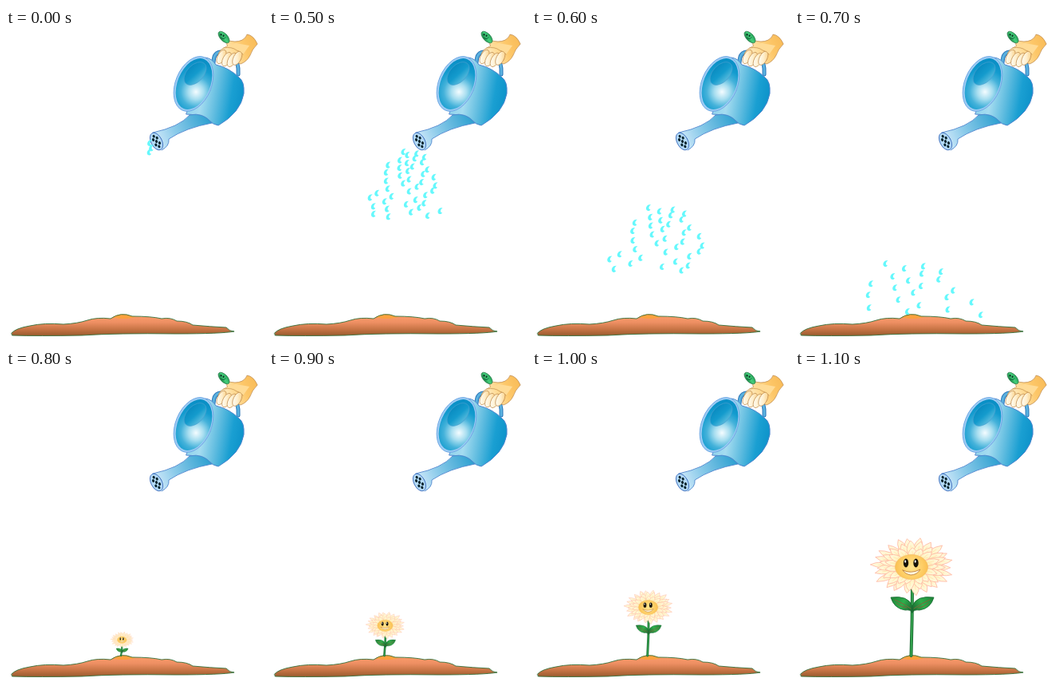
An HTML page with a canvas that plays this animation: 322x392 px, repeating every 3.1 s.

```html
<!DOCTYPE html>
<html lang="en">
<head>
<meta charset="utf-8">
<title>Watering</title>
<style>
html, body { margin: 0; width: 100%; height: 100%; overflow: hidden; background: #fff; }
canvas { display: block; width: 322px; height: 392px; }
</style>
</head>
<body>
<canvas id="stage" width="322" height="392"></canvas>
<script>
const g = document.getElementById('stage').getContext('2d');
const LOOP = 3100;
const TAU = Math.PI * 2;
g.lineJoin = g.lineCap = 'round';

function paint(path, fill, line, width = 1) {
  const p = typeof path === 'string' ? new Path2D(path) : path;
  if (fill) { g.fillStyle = fill; g.fill(p); }
  if (line) { g.strokeStyle = line; g.lineWidth = width; g.stroke(p); }
}

function oval(x, y, rx, ry, turn = 0) {
  const p = new Path2D();
  p.ellipse(x, y, rx, ry, turn, 0, TAU);
  return p;
}

function addStops(gradient, colors) {
  colors.forEach((c, i) => gradient.addColorStop(i / (colors.length - 1), c));
  return gradient;
}
const blend = (x0, y0, x1, y1, ...colors) => addStops(g.createLinearGradient(x0, y0, x1, y1), colors);
const glow = (x, y, r, ...colors) => addStops(g.createRadialGradient(x, y, 0, x, y, r), colors);

// run a drawing in moved, turned and scaled coordinates
function at(x, y, turn, sx, sy, body) {
  g.save();
  g.translate(x, y);
  g.rotate(turn);
  g.scale(sx, sy);
  body();
  g.restore();
}

function seeded(seed) {
  return () => {
    seed = (seed * 16807) % 2147483647;
    return seed / 2147483647;
  };
}

const soil = 'M7 382 Q12 376 30 373 Q48 369 72 371 Q90 370 102 366 T131 364 Q144 355 158 361' +
  ' Q182 361 195 364 Q206 362 214 367 Q227 367 234 372 Q256 374 276 375 Q280 380 286 380' +
  ' Q270 383 212 383 Q140 382 95 385 Q40 386 8 385 Z';

function drawSoil() {
  paint(soil, blend(0, 360, 0, 386, '#fb9c6a', '#ee8f63', '#c77445', '#95592c'));
  g.save();
  g.clip(new Path2D(soil));
  paint(oval(147, 360, 16, 4), 'rgba(255,164,45,.7)');
  g.restore();
  paint(soil, null, '#34713c', .9);
}

function drawCan() {
  const edge = '#4f86cf';
  const handle = 'M260 43 Q260 30 270 30 L284 34 Q292 42 291 58';
  paint(handle, null, '#2f78b8', 5);
  paint(handle, null, '#5ab2e0', 3);
  // body
  paint('M250 37 Q258 38 263 46 Q280 50 292 62 Q299 67 298 82 Q294 106 266 122' +
    ' Q259 121 254 115 Q240 108 226 108 Z',
    blend(228, 80, 300, 92, '#8fd2ec', '#a5dcf0', '#62bde0', '#1a9fd2', '#0a90c8'), edge);
  // spout
  paint('M230 109 Q217 124 184 131 L195 153 Q205 148 204 139 Q225 125 258 119 Q247 105 230 109 Z',
    blend(190, 140, 256, 112, '#c8e6f8', '#8ccbea', '#5ab4dc', '#2a9fd0'));
  paint('M258 119 Q247 105 230 109 Q217 124 184 131 M195 153 Q205 148 204 139 Q225 125 258 119',
    null, edge, .9);
  // rim and opening
  paint(oval(235, 70, 22.5, 36, .39), '#9ccbf4', '#6fa8e4');
  paint(oval(235.5, 70, 20.5, 33.5, .39),
    glow(238, 80, 38, '#f4fcff', '#a8def0', '#45b2da', '#149ccf', '#0a90c6'));
  paint(oval(237, 57, 10.5, 17, .75),
    blend(228, 48, 246, 68, '#0788be', '#149bcd', '#6fc6e2'), '#4aa0d0', .7);
  // rose with rows of holes
  paint(oval(188.5, 142, 6.8, 11.7, -.48), '#b4daf6', '#4272c0');
  at(188.5, 142, -.48, 1, 1, () => {
    for (let row = -2; row <= 2; row++) {
      for (const side of row % 2 ? [-2.6, 2.6] : [0]) paint(oval(side, row * 3.6, 1.5, 1.9), '#06232c');
    }
  });
}

function drawHand() {
  const edge = '#b98344';
  paint('M276 15 Q288 19 296 15 Q301 12 302 8 Q310 9 315 20 Q308 27 306 34' +
    ' Q302 42 294 45 L266 33 Q268 26 277 23 Z',
    blend(270, 34, 312, 16, '#fff0cd', '#ffdc98', '#fdc769', '#f9bd5a'), edge, .7);
  for (let i = 0; i < 4; i++) {
    const x = 270 + i * 6.6, y = 36 + 4 * Math.sin(i * .9);
    paint(oval(x, y, 4.8, 9.5, .48), blend(x - 5, y, x + 6, y, '#fffaec', '#ffeecb', '#fbd38d'), edge, .7);
  }
  paint('M273 25 Q285 22 297 33 L305 22 L288 19 Z', '#ffdb95');
  paint('M273 25 Q283 23 289 28 Q295 29 297 33', null, edge, .6);
  // thumb
  paint(oval(273, 11.5, 4.6, 9, -.75), blend(268, 14, 278, 8, '#15803f', '#45cf7c', '#1e9a50'), '#2a7a4c', .8);
  for (const x of [269.5, 272.5]) paint(oval(x, x / 2 - 126.5, 1, 1.2), '#092d20');
  paint('M269 12 Q272 15 275 12', null, '#075031', .9);
}

const drop = new Path2D('M3 -4 C-1.5 -4.3 -3.8 -.5 -2.6 2.6 C-1.3 4.8 1.6 4.4 2.5 2.2' +
  ' C0 2.2 -.4 -1 3 -4 Z');

// a fan of drops whose left and right edges spread from its top to its bottom
function drawDrops({ count, top, depth, left, right, spread }) {
  const rand = seeded(77);
  for (let i = 0; i < count; i++) {
    const v = (i + rand() * .6) / count;
    const u = (i * .618 + rand() * .15) % 1;
    const open = Math.pow(v, spread);
    const x0 = left[0] + (left[1] - left[0]) * open;
    const x1 = right[0] + (right[1] - right[0]) * open;
    at(x0 + (x1 - x0) * u, top + depth * v, 0, 1, 1, () => paint(drop, '#66f8fc'));
  }
}

const sprays = [
  { count: 3, top: 144, depth: 17, left: [180, 174], right: [182, 188], spread: 1 },
  { count: 42, top: 155, depth: 83, left: [168, 114], right: [194, 218], spread: .6 },
  { count: 36, top: 225, depth: 80, left: [145, 85], right: [192, 228], spread: .8 },
  { count: 22, top: 295, depth: 66, left: [112, 58], right: [184, 238], spread: 1 }
];

function drawPetals(count, reach, seed) {
  const rand = seeded(seed);
  for (let i = 0; i < count; i++) {
    const long = reach * (.92 + .1 * rand());
    const turn = (i + rand() * .4) / count * TAU;
    g.save();
    g.scale(1, .7);
    g.rotate(turn);
    paint(`M12 -3 Q${long * .72} -10 ${long} -1 Q${long * .8} 8 12 4 Z`,
      blend(15, 0, long, 0, '#ffe9a8', '#fff6cc', '#fff8dc'), '#ffb09c', .8);
    paint(`M19 0 L${long * .8} -1 M22 2 L${long * .7} 3`, null, '#ffdc9c', .6);
    g.restore();
  }
}

function drawLeaf(side) {
  at(0, 0, 0, side, 1, () => {
    paint('M0 50 Q5 36 27 39 Q23 53 9 55 Q2 54 0 58 Z',
      blend(0, 53, 24, 40, '#1c6b30', '#2fae4c', '#1f8a3a'), '#1a6a34', .8);
    paint('M2 53 Q12 46 22 42 M7 52 Q15 51 20 46', null, '#7c6a3a', 1);
  });
}

function drawFlower(size, height) {
  const x = 145 + 2 * size, y = 359 - height;
  const stem = `M${x} ${y + 22 * size} Q${x} ${y + height * .6} ${x - 1.5} 359`;
  paint(stem, null, '#1d6f35', 1.4 + 2.6 * size);
  paint(stem, null, '#35a850', .4 + 1.4 * size);
  at(x, y, 0, size, size, () => {
    drawLeaf(-1);
    drawLeaf(1);
    drawPetals(22, 52, 5);
    drawPetals(19, 45, 12);
    drawPetals(15, 35, 31);
    paint(oval(-1, 1, 20.5, 15.5), glow(-1, 1, 20, '#ffe48e', '#ffd571', '#fbc153'), '#f2bd66', .6);
    for (const ex of [-8, 4.5]) {
      paint(oval(ex, -4, 3.2, 5.4), '#151109');
      paint(oval(ex - .8, -6, 1, 1.8), '#fff');
    }
    paint('M-12 5 Q-2 10 10 4 Q6 11 -2 11 Q-9 10 -12 5 Z', '#fff8df', '#b97530', .8);
  });
}

// size and height of the flower as it grows
const growth = [[.28, 20], [.47, 38], [.59, 61], [1, 112]];

function draw(t) {
  g.fillStyle = '#fff';
  g.fillRect(0, 0, 322, 392);
  const step = t < 500 ? 0 : Math.min(7, Math.floor(t / 100) - 4);
  drawSoil();
  drawCan();
  drawHand();
  if (step < sprays.length) drawDrops(sprays[step]);
  else drawFlower(...growth[step - sprays.length]);
}

const start = performance.now();
function tick() {
  draw((performance.now() - start) % LOOP);
  requestAnimationFrame(tick);
}
tick();
</script>
</body>
</html>
```
